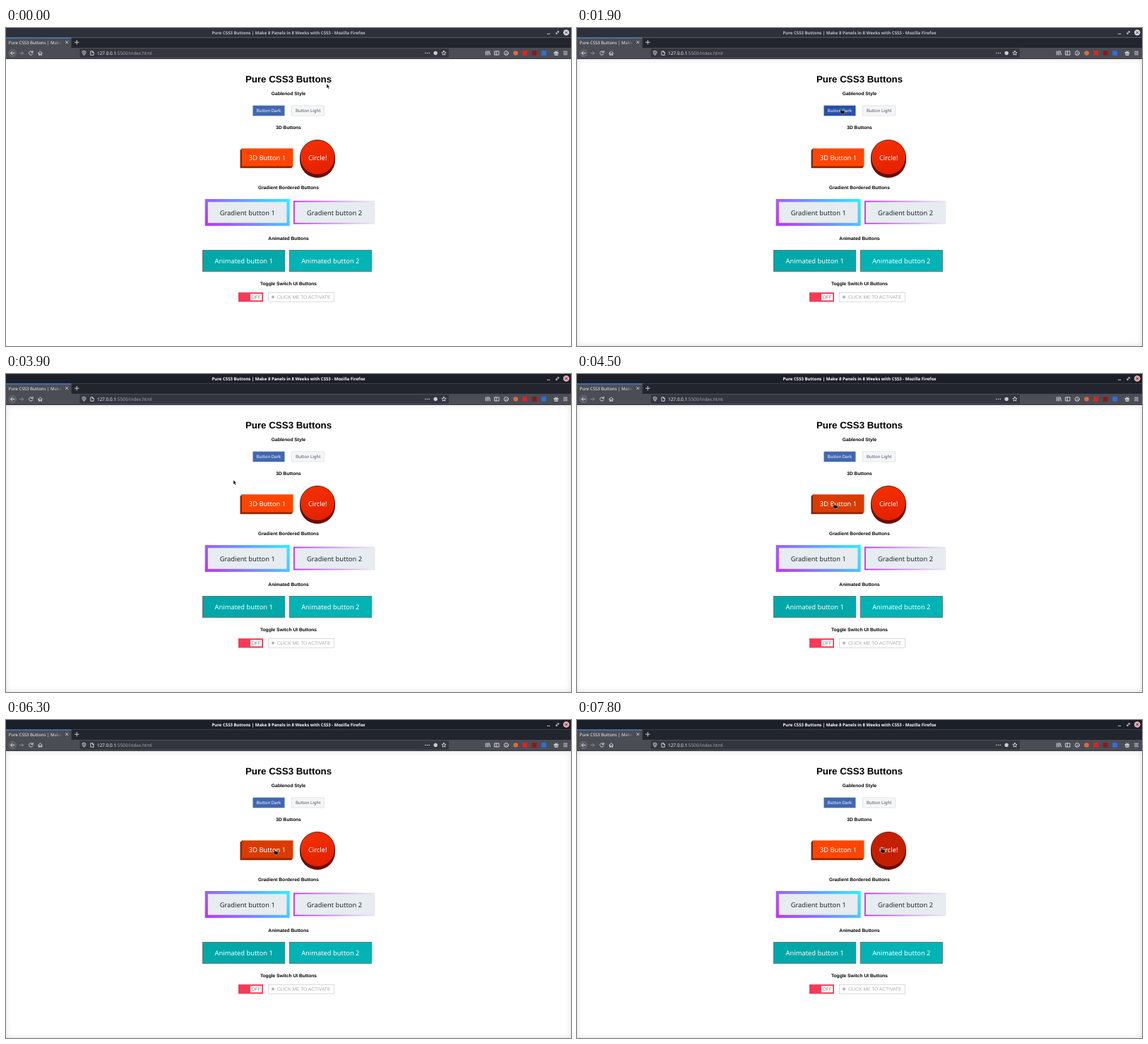
Write an HTML page that moves like this. It is 800 px wide and 450 px high and loops after 8000 ms.

```html
<!DOCTYPE html>
<html lang="en">
<head>
<meta charset="utf-8">
<title>Pure CSS3 Buttons</title>
<style>
  html, body { margin: 0; width: 100%; height: 100%; overflow: hidden; background: #fff; }
  #vignette { position: absolute; left: 0; top: 44px; width: 800px; height: 406px; box-shadow: inset 0 0 9px rgba(0, 0, 0, .13); }
  svg { position: absolute; left: 0; top: 0; width: 800px; height: 450px; display: block; }
  text { text-rendering: geometricPrecision; font-family: "Noto Sans", "Open Sans", sans-serif; }
  .mid { text-anchor: middle; }
  .head { font: bold 6.667px "Liberation Sans", Arial, sans-serif; text-anchor: middle; fill: #000; }
  .h1 { font-size: 13.333px; }
  .label { font-size: 9.33px; text-anchor: middle; }
  .small { font-size: 6.04px; text-anchor: middle; }
  .ui { font: 6.667px "Liberation Sans", Arial, sans-serif; }
  .icon { fill: none; stroke: #dcdde0; stroke-width: .9; stroke-linecap: round; stroke-linejoin: round; }
</style>
</head>
<body>
<div id="vignette"></div>
<svg viewBox="0 0 800 450">
  <defs>
    <linearGradient id="neon" gradientUnits="userSpaceOnUse" x1="302" y1="300.5" x2="381" y2="221.5">
      <stop offset="0" stop-color="#c032fa"/><stop offset="1" stop-color="#2cf2ff"/>
    </linearGradient>
    <linearGradient id="fade">
      <stop offset="0" stop-color="#c02ff0"/><stop offset="1" stop-color="#e6ecf0"/>
    </linearGradient>
    <linearGradient id="tabEnd">
      <stop offset="0" stop-color="#4b4d55" stop-opacity="0"/><stop offset="1" stop-color="#4b4d55"/>
    </linearGradient>
    <linearGradient id="red" x1=".3" y1="0" x2=".6" y2="1">
      <stop offset="0" stop-color="#f53000"/><stop offset="1" stop-color="#e42000"/>
    </linearGradient>
  </defs>

  <!-- window title -->
  <rect width="800" height="13.5" fill="#2c313a"/>
  <rect id="titleBar" width="800" height="13.5" fill="#1b1f28"/>
  <text id="title" class="mid" x="400" y="8.8" font-size="6.03" font-weight="bold">Pure CSS3 Buttons | Make 8 Panels in 8 Weeks with CSS3 - Mozilla Firefox</text>
  <g class="icon">
    <path d="M766.5 8.3h3.4M779 8.2l3.4-3.4M780.8 4.8h1.6v1.6M779 6.6v1.6h1.6"/>
  </g>
  <circle cx="793.3" cy="6.4" r="4.2" fill="#d5d7da"/>
  <circle id="closeDot" cx="793.3" cy="6.4" r="4.2" fill="#e8a3ab"/>
  <path d="M791.8 4.9l3 3m0-3l-3 3" stroke="#20242c" stroke-width=".9"/>

  <!-- tabs -->
  <rect y="13.5" width="800" height="14.5" fill="#22252d"/>
  <rect y="13.5" width="92.5" height="14.5" fill="#4b4d55"/>
  <rect y="13.5" width="92.5" height="1" fill="#3f8ff0"/>
  <path d="M93 15v12" stroke="#3a3d45" stroke-width=".6"/>
  <text x="3.8" y="22.5" font-size="6.07" fill="#f4f4f5">Pure CSS3 Buttons | Make</text>
  <rect x="66" y="15" width="14" height="12" fill="url(#tabEnd)"/>
  <path class="icon" d="M84.6 18.6l3.2 3.2m0-3.2l-3.2 3.2M97.4 20.2h5.6M100.2 17.4v5.6"/>

  <!-- toolbar -->
  <rect y="28" width="800" height="16" fill="#4b4d55"/>
  <rect y="43.4" width="800" height=".6" fill="#2b2d33"/>
  <rect x="104.5" y="29.3" width="522.5" height="12.4" rx="1" fill="#33363e"/>
  <circle cx="9.2" cy="35.6" r="5.4" fill="#5c5e66" stroke="#75777e" stroke-width=".5"/>
  <path class="icon" d="M12 35.6H6.6m2.3-2.3l-2.3 2.3 2.3 2.3"/>
  <path class="icon" style="stroke:#8f9197" d="M19.3 35.6h5.4m-2.3-2.3l2.3 2.3-2.3 2.3"/>
  <g class="icon">
    <path d="M37.6 34.2a2.7 2.7 0 1 0 .2 2.2M38 32.3v2.2h-2.2"/>
    <path d="M45.4 35.7l3-2.8 3 2.8M46.4 35.4v3h1.3v-1.8h1.4v1.8h1.3v-3"/>
    <path d="M110.5 32.5l2.4.8c0 2.5-.7 4.1-2.4 5.2-1.7-1.1-2.4-2.7-2.4-5.2zM110.5 34v3"/>
    <path d="M120.2 32.8h2.4l1.5 1.5v4h-3.9zM122.4 33v1.6h1.6"/>
    <path d="M593.8 35.5h.1M596.5 35.5h.1M599.2 35.5h.1" stroke-width="1.4"/>
    <path d="M620 32.3l.9 2 2.2.2-1.7 1.5.5 2.2-1.9-1.2-1.9 1.2.5-2.2-1.7-1.5 2.2-.2z"/>
    <path d="M679.3 33v5M681.2 32.6v5.4M683 32.6v5.4M684.2 33l1.4 5"/>
    <path d="M692 33h6v5h-6zM694.2 33v5"/>
    <circle cx="708.3" cy="35.5" r="3"/>
    <path d="M708.3 34.3v.2M706.5 37.3c.8-1.3 2.8-1.3 3.6 0"/>
    <path d="M776.4 34.5h5.4v1.3h-5.4zM777 36v2.4h4.2V36M779.1 34.5v3.9M779.1 34.3l-1.5-1.8M779.1 34.3l1.5-1.8"/>
    <path d="M789.6 33.3h5M789.6 35.5h5M789.6 37.7h5"/>
  </g>
  <circle cx="608.2" cy="35.5" r="2.7" fill="#c9cacd"/>
  <circle cx="721.6" cy="35.5" r="3.3" fill="#de6a3c"/>
  <rect x="731.3" y="32.2" width="6.6" height="6.6" fill="#e0231f"/>
  <rect x="744.9" y="32.3" width="6.4" height="6.4" fill="#94131c"/>
  <rect x="758.3" y="32.2" width="6.6" height="6.6" fill="#2f6fe0"/>
  <text x="129" y="37.9" font-size="6.4" fill="#f8f8f8">127.0.0.1<tspan fill="#a3a5aa">:5500/index.html</tspan></text>

  <!-- page -->
  <text class="head h1" style="font-size:13.333px" x="400" y="76.7">Pure CSS3 Buttons</text>
  <text class="head" x="400" y="95.1">Gablenod Style</text>
  <text class="head" x="400" y="143.3">3D Buttons</text>
  <text class="head" x="400" y="227.5">Gradient Bordered Buttons</text>
  <text class="head" x="400" y="299.5">Animated Buttons</text>
  <text class="head" x="400" y="363.8">Toggle Switch UI Buttons</text>

  <rect id="dark" x="349.5" y="109.7" width="45" height="14.6" fill="#4267b2"/>
  <text class="small" x="372" y="119.3" fill="#fff">Button Dark</text>
  <rect id="light" x="404.5" y="109.9" width="46.2" height="14.2" fill="#f5f6f7" stroke="#ccd0d5" stroke-width=".5"/>
  <text class="small" x="427.7" y="119.3" fill="#4b4f56">Button Light</text>

  <path d="M334 170.4l-2.5 2.5V198.2H404l2.5-2.5z" fill="#8c2600"/>
  <g id="boxFace">
    <rect id="box" x="334" y="170.4" width="72.5" height="25.2" fill="#ff4500"/>
    <text class="label" x="370" y="186.5" fill="#fff">3D Button 1</text>
  </g>

  <path d="M416 183v4a25 25 0 0 0 50 0v-4z" fill="#6a1000"/>
  <g id="discFace">
    <circle cx="441" cy="183" r="24.6" fill="url(#red)" stroke="#3d0a00" stroke-width=".8"/>
    <circle id="disc" cx="441" cy="183" r="24.2" fill="#c41f00"/>
    <text class="label" x="441.2" y="186.5" fill="#fff">Circle!</text>
  </g>

  <rect x="281.7" y="242" width="120" height="38" fill="url(#neon)"/>
  <rect x="285.9" y="246.2" width="111.6" height="29.6" fill="#e6ecf0"/>
  <text class="label" x="341.7" y="264.5" fill="#222b33">Gradient button 1</text>
  <rect x="407" y="244.5" width="115.2" height="33" fill="url(#fade)"/>
  <rect x="408.8" y="246.3" width="113.4" height="29.4" fill="#e6ecf0"/>
  <text class="label" x="465" y="264.5" fill="#222b33">Gradient button 2</text>

  <g stroke="#56686a" stroke-width=".8">
    <rect x="278.4" y="314.4" width="116.4" height="30" fill="#00a8a9"/>
    <rect x="401.2" y="314.4" width="116.4" height="30" fill="#00b3b5"/>
  </g>
  <text class="label" x="336.7" y="332.7" fill="#fff">Animated button 1</text>
  <text class="label" x="459.3" y="332.7" fill="#fff">Animated button 2</text>

  <rect x="329" y="374.2" width="35" height="13.3" fill="#f53b57"/>
  <rect x="346" y="376.3" width="16.2" height="9.1" fill="#fff"/>
  <text class="ui mid" x="354.1" y="383.2" fill="#85787c">OFF</text>
  <rect x="371.4" y="374.5" width="93.2" height="12.8" fill="#fff" stroke="#ccc" stroke-width=".7"/>
  <circle cx="378" cy="380.7" r="2.1" fill="#b8b8b8"/>
  <text class="ui" x="384" y="383.2" fill="#a9a9a9">CLICK ME TO ACTIVATE</text>

  <!-- pointer -->
  <g id="pointer" fill="#111" stroke="#fff" stroke-width=".4" stroke-linejoin="round">
    <path id="arrow" d="M0 0v6.3l1.5-1.3 1 2.3 1.1-.5-1-2.2h1.9z"/>
    <path id="hand" d="M.6 1.2C.5.1 1.8-.1 2.1 1l.5 1.9 3 .5c1.1.2 1.7.9 1.5 2L6.7 8H2.6L.1 5.3c-.5-.7.3-1.4 1.1-.8z"/>
  </g>
</svg>
<script>
const LOOP = 8000, STEP = 100;
// pointer tip: [ms, x, y]
const path = [
  [0, 454, 79], [100, 454, 79], [400, 396, 65], [500, 396, 65],
  [800, 370, 74], [1100, 346, 91], [1200, 350, 98], [1400, 371, 113],
  [1800, 371, 113], [2000, 373, 114.5], [2600, 373, 114.5], [2700, 373.5, 115],
  [3300, 434, 115], [3600, 434, 115], [3900, 322, 150], [4000, 323, 158],
  [4200, 337, 172], [4500, 362, 182.5], [6100, 362, 182.5],
  [6600, 403, 183], [6800, 419, 181.3], [7000, 429, 180.2], [LOOP, 429, 180.2]
];
const $ = id => document.getElementById(id);
const clamp = v => Math.max(0, Math.min(1, v));
const show = (id, v) => $(id).setAttribute("opacity", +v);
const move = (id, x, y) => $(id).setAttribute("transform", `translate(${x} ${y})`);
const fill = (id, color) => $(id).setAttribute("fill", color);
const during = (t, a, b) => t >= a && t < b;

function tip(t) {
  const i = path.findIndex(p => p[0] > t);
  const [t0, x0, y0] = path[i - 1], [t1, x1, y1] = path[i];
  const k = (t - t0) / (t1 - t0);
  return [x0 + (x1 - x0) * k, y0 + (y1 - y0) * k];
}

function draw(now) {
  const t = Math.floor(now % LOOP / STEP) * STEP;
  const [x, y] = tip(t);
  const inside = (l, top, r, b) => x >= l && x <= r && y >= top && y <= b;
  const onDark = inside(349, 109, 395, 125);
  const onLight = inside(404, 109, 451, 125);
  const onBox = inside(331, 170, 407, 198);
  const onDisc = Math.hypot(x - 441, y - 183) < 25;
  const link = onDark || onLight || onBox || onDisc;

  move("pointer", x, y);
  show("hand", link);
  show("arrow", !link);
  fill("dark", onDark ? "#2850a8" : "#4267b2");
  fill("light", onLight ? "#e9ebee" : "#f5f6f7");
  fill("box", onBox ? "#da3b00" : "#ff4500");
  show("disc", onDisc);

  const boxDown = during(t, 5200, 5600) ? 1.7 : 0;
  move("boxFace", -boxDown, boxDown);
  move("discFace", 0, during(t, 7400, 7800) ? 2.5 : 0);

  const focus = clamp((t - 2200) / 200);
  show("titleBar", focus);
  show("closeDot", focus);
  const grey = 190 + 65 * focus;
  fill("title", `rgb(${grey},${grey},${grey})`);
  $("vignette").style.opacity = clamp((t - 100) / 300);
}

const start = performance.now();
function tick() {
  draw(performance.now() - start);
  requestAnimationFrame(tick);
}
tick();
</script>
</body>
</html>
```
